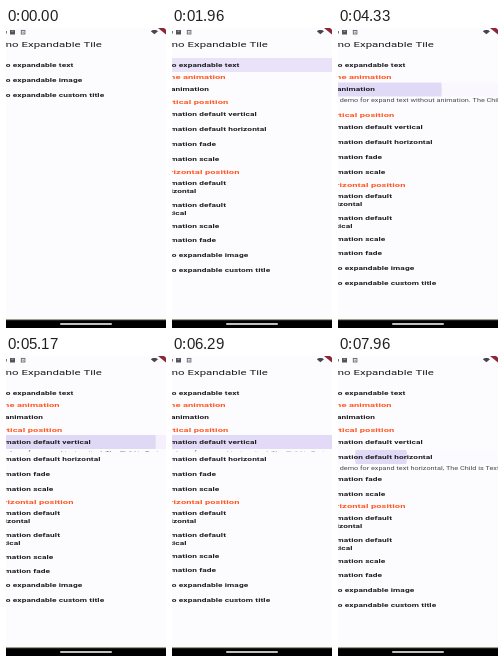
These frames come from a looping animation (160x300 px, 8 s). An HTML page with a canvas:

```html
<!DOCTYPE html>
<html lang="en">
<head>
<meta charset="utf-8">
<title>Expandable tile demo</title>
<style>
html, body { margin: 0; width: 100%; height: 100%; overflow: hidden; background: #fcfbfe; }
canvas { display: block; width: 100vw; height: 100vh; }
</style>
</head>
<body>
<canvas id="stage"></canvas>
<script>
const W = 160, H = 300, LOOP = 8000;
const SX = 0.52, SY = 0.33;
const OUTER = -17.5, INNER = -14;
const INK = '#1d1b20', ACCENT = '#ff5722', PAPER = '#fcfbfe';
const TILE = 14, LIST_TOP = 43, LIST_HEIGHT = 175;

const canvas = document.getElementById('stage');
const ctx = canvas.getContext('2d');
const ratio = window.devicePixelRatio || 1;
canvas.width = W * ratio;
canvas.height = H * ratio;

// Nested list: vertical centre of the first line, text lines, heading flag.
const list = [
  { y: 49, lines: ['None animation'], heading: true },
  { y: 61.5, lines: ['No animation'], id: 'none' },
  { y: 74, lines: ['Vertical position'], heading: true },
  { y: 86, lines: ['Animation default vertical'], id: 'vertical' },
  { y: 101, lines: ['Animation default horizontal'], id: 'horizontal' },
  { y: 116, lines: ['Animation fade'] },
  { y: 131, lines: ['Animation scale'] },
  { y: 143.5, lines: ['Horizontal position'], heading: true },
  { y: 155, lines: ['Animation default', 'horizontal'] },
  { y: 177, lines: ['Animation default', 'vertical'] },
  { y: 198.5, lines: ['Animation scale'] },
  { y: 212.5, lines: ['Animation fade'] }
];

const bodies = {
  none: { text: 'This demo for expand text without animation. The Child is', height: 13 },
  vertical: { text: 'This demo for expand text vertical, The Child is Text', height: 6.6 },
  horizontal: { text: 'This demo for expand text horizontal, The Child is Text', height: 6.6 }
};

const taps = [
  { id: 'text', at: 1640 },
  { id: 'none', at: 2960 }, { id: 'none', at: 4230 },
  { id: 'vertical', at: 5006 }, { id: 'vertical', at: 6060 },
  { id: 'horizontal', at: 6850 }, { id: 'horizontal', at: 7908 }
];

const clamp = v => Math.min(1, Math.max(0, v));
const easeOut = p => 1 - Math.pow(1 - clamp(p), 3);

function openness(t, start, end, duration) {
  if (!duration) return t >= start && t < end ? 1 : 0;
  return t < end ? easeOut((t - start) / duration) : 1 - easeOut((t - end) / duration);
}

function label(text, x, baseline, size, weight = 400, color = INK, spacing = 0) {
  ctx.save();
  ctx.translate(x, baseline);
  ctx.scale(SX, SY);
  ctx.font = `${weight} ${size}px Roboto, sans-serif`;
  ctx.letterSpacing = spacing + 'px';
  ctx.fillStyle = color;
  ctx.fillText(text, 0, 0);
  ctx.restore();
}

function box(x, y, w, h, color) {
  ctx.fillStyle = color;
  ctx.fillRect(x, y, w, h);
}

function shape(points, color) {
  ctx.fillStyle = color;
  ctx.beginPath();
  points.forEach(([x, y]) => ctx.lineTo(x, y));
  ctx.fill();
}

function clipped(x, y, w, h, paint) {
  ctx.save();
  ctx.beginPath();
  ctx.rect(x, y, w, h);
  ctx.clip();
  paint();
  ctx.restore();
}

function ripple(t, id, y) {
  for (const tap of taps) {
    const age = t - tap.at;
    if (tap.id !== id || age < 0 || age > 520) continue;
    const fade = 1 - clamp((age - 200) / 320);
    const top = y - TILE / 2;
    clipped(0, top, W, TILE, () => {
      ctx.globalAlpha = fade * clamp((age - 40) / 160);
      box(0, top, W, TILE, '#f4eefc');
      ctx.globalAlpha = fade * 0.85;
      ctx.fillStyle = '#ddd5f6';
      ctx.beginPath();
      ctx.arc(43, y, Math.max(0, age * 0.72 - 12), 0, Math.PI * 2);
      ctx.fill();
    });
  }
}

function tile(t, id, text, x, y) {
  ripple(t, id, y);
  label(text, x, y + 1.9, 16, 700, INK, 0.15);
}

function body(id, y, open) {
  const { text, height } = bodies[id];
  const sideways = id === 'horizontal';
  const w = sideways ? (W - INNER) * open : W - INNER;
  const h = sideways ? height + 2 : (height + 2) * open;
  clipped(INNER, y + 7, w, h, () => label(text, INNER, y + 12.5, 14, 400, '#49454f'));
  return sideways ? (open > 0.01 ? height : 0) : height * open;
}

function nested(t) {
  const open = {
    none: openness(t, 3085, 4355, 0),
    vertical: openness(t, 5131, 6185, 320),
    horizontal: openness(t, 6975, 8033, 320)
  };
  let shift = 0;
  for (const item of list) {
    const y = item.y + shift;
    if (item.heading) {
      label(item.lines[0], INNER, y + 2.2, 18, 700, ACCENT, 0.15);
      continue;
    }
    item.lines.forEach((line, i) => tile(t, i ? '' : item.id || '-', line, INNER, y + i * 8));
    if (open[item.id]) shift += body(item.id, y, open[item.id]);
  }
  return shift;
}

function statusBar() {
  box(0, 3, 1, 2.5, '#777');
  box(4, 2, 5, 4.5, '#55535a');
  box(5.5, 2.8, 2, 0.7, '#c9c8cc');
  ctx.strokeStyle = '#66646b';
  ctx.lineWidth = 0.9;
  ctx.strokeRect(15.3, 2.4, 3.6, 3.6);
  box(16.5, 3.6, 1.3, 1.2, '#77757c');
  shape([[144.8, 3.2], [146.8, 2.1], [150, 2.1], [152, 3.2], [148.4, 6.3]], '#49474e');
  shape([[152, 0], [158, 0], [160, 1.8], [160, 6.5]], '#8d2636');
}

function navBar() {
  box(0, 291.5, W, 1, '#45451c');
  box(0, 292.2, W, 8, '#000');
  ctx.fillStyle = '#fff';
  ctx.beginPath();
  ctx.roundRect(54, 295.2, 52, 1.6, 0.8);
  ctx.fill();
}

function draw(t) {
  ctx.setTransform(ratio, 0, 0, ratio, 0, 0);
  box(0, 0, W, H, PAPER);
  statusBar();
  label('Demo Expandable Tile', OUTER, 19.2, 22);

  const open = easeOut((t - 1630) / 215);
  let shift = LIST_HEIGHT * open;
  tile(t, 'text', 'Demo expandable text', OUTER, 37);
  if (open) {
    clipped(0, LIST_TOP, W, open < 1 ? shift : H, () => { shift += nested(t); });
  }
  tile(t, 'image', 'Demo expandable image', OUTER, 52 + shift);
  tile(t, 'custom', 'Demo expandable custom title', OUTER, 67 + shift);
  navBar();
}

function tick() {
  draw(performance.now() % LOOP);
  requestAnimationFrame(tick);
}
tick();
</script>
</body>
</html>
```
